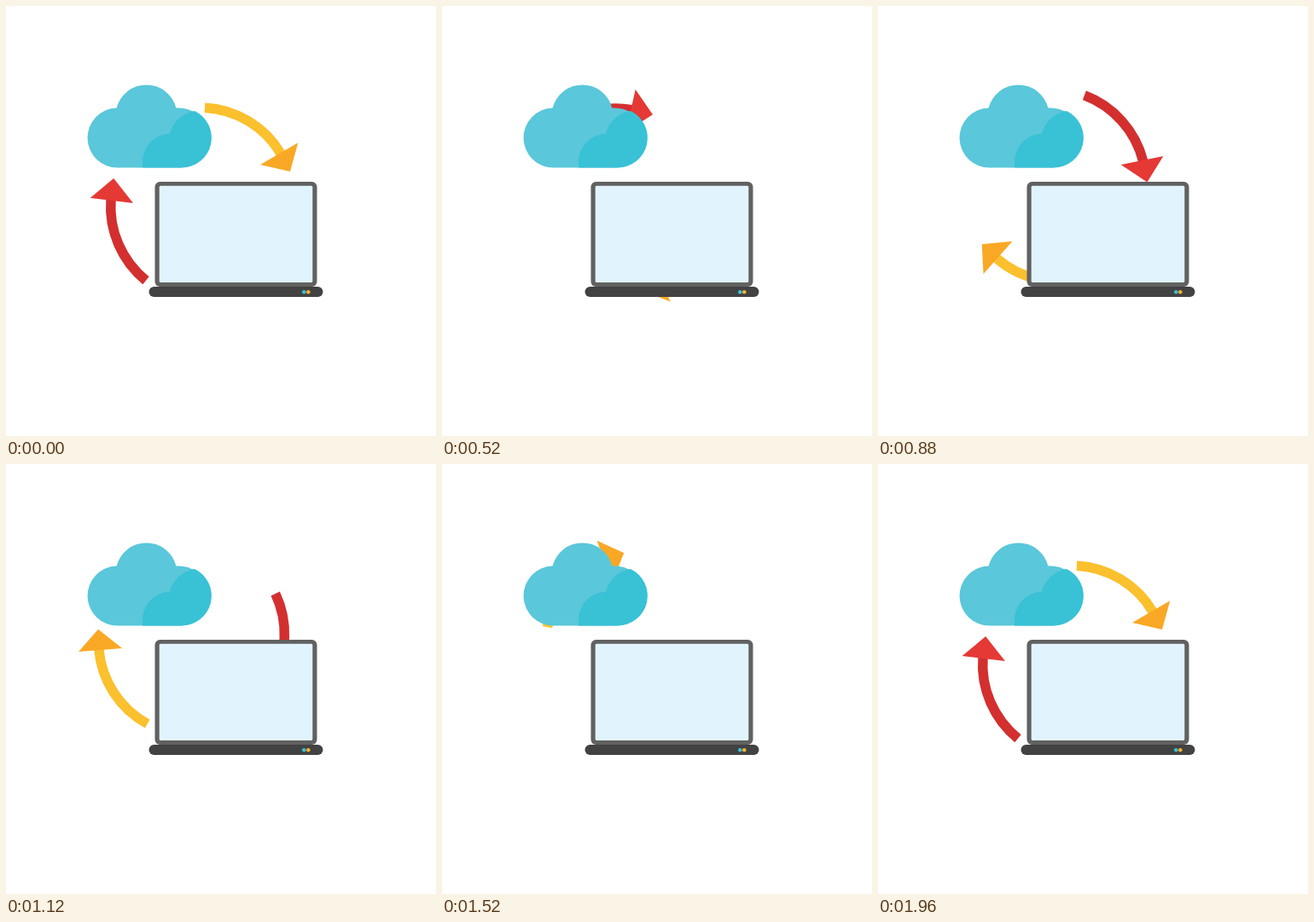
Animation, 504 px wide and 504 px high, one loop 2000 ms. Source, as an HTML page:

```html
<!DOCTYPE html>
<html lang="en">
<head>
<meta charset="utf-8">
<title>Cloud sync</title>
<style>
  html, body { margin: 0; height: 100%; overflow: hidden; background: #fff; }
  svg { display: block; width: 100vw; height: 100vh; }
  .shaft { fill: none; stroke-width: 11.5; }
</style>
</head>
<body>
<svg viewBox="0 0 504 504">
  <g id="arrows">
    <path class="shaft" stroke="#fbc02d" d="M233 119.2A110 110 0 0 1 322 173"/>
    <path fill="#f9a825" d="M298 186L342.3 160.3L333 194Z"/>
    <path class="shaft" stroke="#d32f2f" d="M164 321.7A111.5 111.5 0 0 1 123 227"/>
    <path fill="#e53935" d="M98.7 225L126.2 202L149 231Z"/>
  </g>

  <g id="cloud">
    <path fill="#5ac7da" d="M131.5 189.5A35 35 0 0 1 129.6 119.5A36 36 0 0 1 199.4 119.6A35 35 0 0 1 206 189.5Z"/>
    <path fill="#39c1d6" d="M160 189.5V183A33 33 0 0 1 192 149.7A36 36 0 0 1 221 122.9A35 35 0 0 1 206 189.5Z"/>
  </g>

  <g id="laptop">
    <rect x="174.5" y="206" width="190" height="123" rx="6" fill="#616161"/>
    <rect x="179.7" y="210.7" width="179.6" height="113.3" rx="1.5" fill="#e1f4fe"/>
    <rect x="167.5" y="329" width="204" height="12" rx="6" fill="#424242"/>
    <circle cx="349.3" cy="335.2" r="2.3" fill="#39c1d6"/>
    <circle cx="354.3" cy="335.2" r="2.3" fill="#fbb02d"/>
  </g>
</svg>
<script>
  const LOOP = 2000, STEP = 40, LAST = LOOP / STEP - 1;
  const arrows = document.getElementById("arrows");

  // One full clockwise turn, ending on the last step of the loop.
  function draw() {
    const step = Math.floor(performance.now() % LOOP / STEP);
    arrows.setAttribute("transform", `rotate(${step / LAST * 360} 220.5 219.5)`);
    requestAnimationFrame(draw);
  }
  draw();
</script>
</body>
</html>
```
